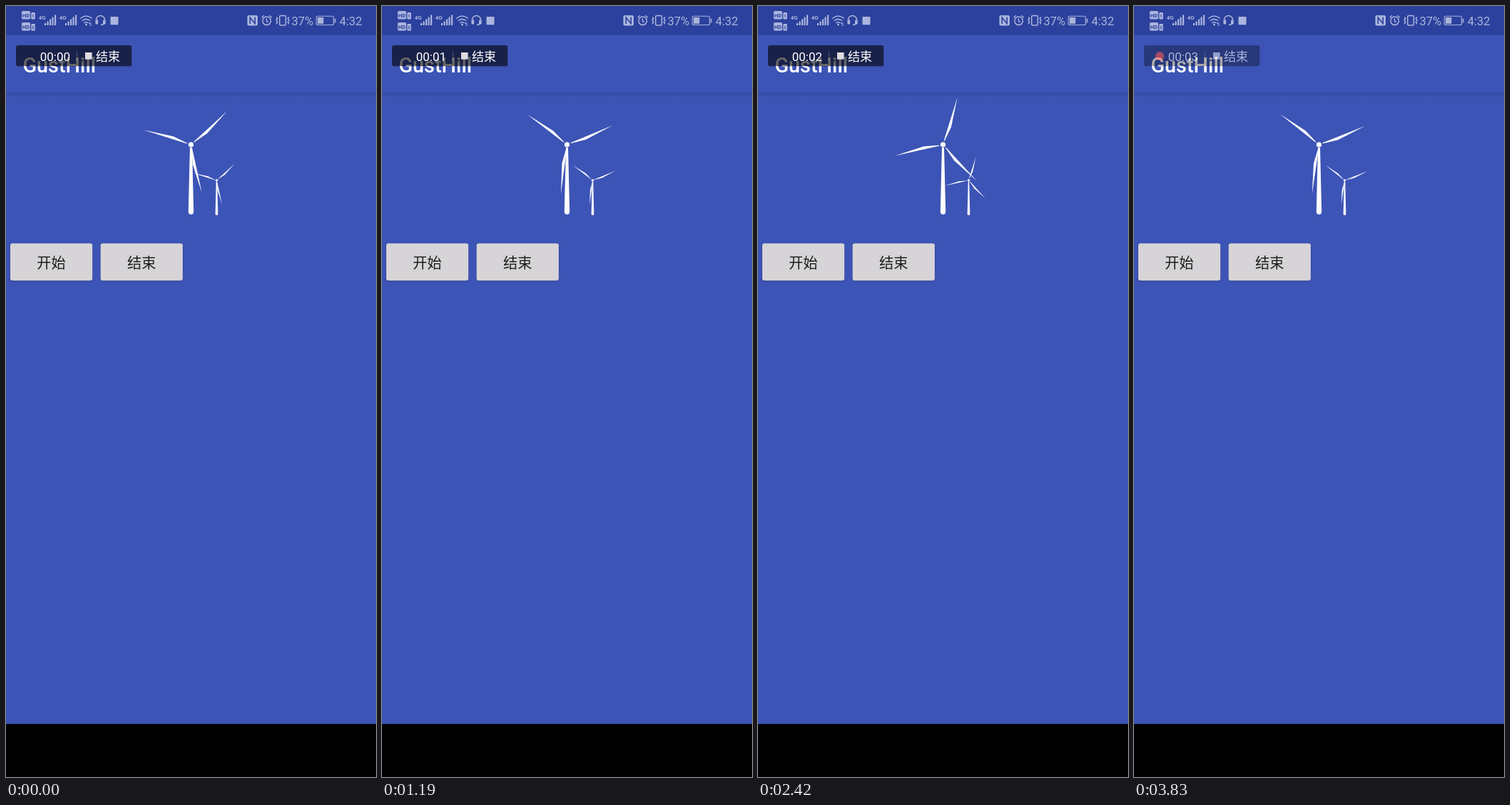
Write an HTML page that moves like this. It is 519 by 1079 pixels and loops after 3910 ms.

```html
<!DOCTYPE html>
<html lang="zh-CN">
<head>
<meta charset="utf-8">
<title>GustHill</title>
<style>
  html, body { margin: 0; width: 100%; height: 100%; overflow: hidden; background: #3c54b6; }
  svg { display: block; width: 100vw; height: 100vh; }
  text { font-family: Roboto, "Noto Sans CJK SC", "Noto Sans CJK", sans-serif; }
  .status { fill: #abb5dd; font-size: 16.5px; }
  .tiny { font-size: 8px; font-weight: 600; }
  .cut { fill: #2c419d; font-size: 7.6px; font-weight: 700; }
  .sim { fill: #2c419d; font-size: 6px; font-weight: 700; }
  .line { fill: none; stroke: #abb5dd; stroke-width: 1.5; }
  .title { font-size: 28.8px; font-weight: 500; fill: #fff; }
  .panel text { font-size: 17px; fill: #fff; }
  .button rect { filter: drop-shadow(0 1px 1.2px rgba(0,0,0,.2)); }
  .button text { font-size: 20.2px; fill: #1b1b1c; text-anchor: middle; }
</style>
</head>
<body>
<svg viewBox="0 0 519 1079" preserveAspectRatio="none">
  <defs>
    <linearGradient id="shade" x2="0" y2="1">
      <stop stop-color="#000" stop-opacity=".11"/>
      <stop offset="1" stop-color="#000" stop-opacity="0"/>
    </linearGradient>
    <radialGradient id="spot">
      <stop stop-color="#e4e0e0" stop-opacity=".55"/>
      <stop offset=".74" stop-color="#dcd8da" stop-opacity=".5"/>
      <stop offset=".84" stop-color="#77777c" stop-opacity=".28"/>
      <stop offset="1" stop-color="#77777c" stop-opacity="0"/>
    </radialGradient>
    <path id="blade" d="M-.4-5.5L.5-5.5L3.8-27L0-69.5Z"/>
    <g id="bars">
      <path d="M0 24h2.2v3h-2.2zM3.5 21.5h2.2V27h-2.2zM7 18.5h2.2V27H7zM10.5 15.5h2.2V27h-2.2zM14 12.5h2.2V27H14z"/>
      <text class="tiny" x="-8.3" y="19.3">4G</text>
    </g>
    <g id="hd">
      <rect width="12" height="11.5" rx="2"/>
      <text class="cut" x=".8" y="8.5">HD</text>
      <rect x="13.3" y="2" width="5.5" height="9.5" rx="1.2"/>
    </g>
    <g id="mill" fill="#fff">
      <path d="M-1.5 4H1.5L3.7 94A3.7 3.7 0 0 1-3.7 94Z"/>
      <g class="rotor">
        <use href="#blade"/>
        <use href="#blade" transform="rotate(120)"/>
        <use href="#blade" transform="rotate(240)"/>
      </g>
      <circle r="3.6"/>
    </g>
  </defs>

  <rect width="519" height="1079" fill="#3c54b6"/>
  <rect width="519" height="40.5" fill="#2c419d"/>
  <rect y="121.5" width="519" height="7" fill="url(#shade)"/>
  <rect y="1004.8" width="519" height="75"/>

  <g class="status">
    <use href="#hd" x="22" y="7"/><text class="sim" x="36.3" y="15.9">1</text>
    <use href="#hd" x="22" y="23"/><text class="sim" x="36.3" y="31.9">2</text>
    <use href="#bars" x="54"/>
    <use href="#bars" x="83"/>
    <path class="line" d="M104 17.5Q112.5 10.5 121 17.5M106.8 20.8Q112.5 16 118.2 20.8M109.4 23.8Q112.5 21.2 115.6 23.8"/>
    <circle cx="112.5" cy="26" r="1.4"/>
    <path d="M116 25l2-2.5 2 2.5zM117 26l1.8 2 1.8-2z"/>
    <path class="line" d="M126.5 22V19.5A6 6 0 0 1 138.5 19.5V22Q138.5 26 133 26.5"/>
    <rect x="125.5" y="19.5" width="3.6" height="6" rx="1.2"/>
    <rect x="136" y="19.5" width="3.6" height="6" rx="1.2"/>
    <rect x="146.5" y="15" width="11" height="11.3" rx="1"/>

    <rect x="338.5" y="13" width="14.5" height="14.5" rx="2"/>
    <path d="M342.3 25V16L349.3 24.5V15.5" fill="none" stroke="#2c419d" stroke-width="1.6"/>
    <circle class="line" cx="365.7" cy="20.8" r="5.8"/>
    <path class="line" d="M365.5 17.3V21.2L368 22.8M358.6 16.2L362 13.2M372.8 16.2L369.4 13.2"/>
    <rect class="line" x="383.8" y="13.5" width="8.6" height="13.5" rx="1.5"/>
    <path class="line" d="M379.2 15.5l1.6 2-1.6 2.6 1.6 2.6-1.6 2.3M397 15.5l-1.6 2 1.6 2.6-1.6 2.6 1.6 2.3"/>
    <text x="400.5" y="26.5">37%</text>
    <rect class="line" x="435.3" y="14.3" width="24.2" height="12.2" rx="2" style="stroke-width:1.1"/>
    <rect x="437" y="16" width="8.3" height="8.8"/>
    <rect x="460.8" y="17.5" width="1.6" height="6"/>
    <text x="467.7" y="26.5">4:32</text>
  </g>

  <text class="title" x="23.5" y="92.5">GustHill</text>

  <g class="panel" id="panel">
    <rect x="14" y="55" width="162.3" height="29.3" rx="3" fill-opacity=".6"/>
    <circle id="dot" cx="36" cy="70" r="6" fill="#ff4227"/>
    <text id="clock" x="47.7" y="76.5">00:00</text>
    <path d="M99.5 63V77" stroke="#fff" stroke-opacity=".25"/>
    <rect x="111" y="65" width="9.6" height="9.6" fill="#dedee2"/>
    <text x="126" y="77">结束</text>
  </g>

  <use href="#mill" transform="translate(259.5 194)"/>
  <use href="#mill" transform="translate(295.5 244) scale(.5)"/>

  <g class="button">
    <rect x="6" y="332.3" width="115.2" height="52" rx="2.8" fill="#d6d4d7"/>
    <rect id="press1" x="6" y="332.3" width="115.2" height="52" rx="2.8" opacity="0"/>
    <text x="63.4" y="366.7">开始</text>
  </g>
  <g class="button">
    <rect x="132.7" y="332.3" width="115.2" height="52" rx="2.8" fill="#d6d4d7"/>
    <rect id="press2" x="132.7" y="332.3" width="115.2" height="52" rx="2.8" opacity="0"/>
    <text x="190.2" y="366.7">结束</text>
  </g>
  <circle id="touch1" cx="67" cy="346" r="20" fill="url(#spot)" opacity="0"/>
  <circle id="touch2" cx="190" cy="369" r="20" fill="url(#spot)" opacity="0"/>
</svg>
<script>
  const LOOP = 3910, STEP = 42.56, LAST = 90;
  const $ = id => document.getElementById(id);
  const rotor = document.querySelector('.rotor');

  // [ms, value] pairs, linear in between
  const angle = [[780, 47.2], [890, 53.1], [1450, 79], [1910, 106], [2420, 136.6], [2850, 163.7], [3250, 188]];
  const fades = {
    touch1: [[510, 0], [550, 1], [850, 1], [1000, 0]],
    press1: [[590, 0], [680, .12], [920, .12], [1180, 0]],
    touch2: [[2990, 0], [3030, 1], [3230, 1], [3390, 0]],
    press2: [[3060, 0], [3140, .12], [3300, .12], [3560, 0]],
    panel: [[3700, 1], [3830, .55]]
  };

  function at(keys, t) {
    if (t <= keys[0][0]) return keys[0][1];
    for (let i = 1; i < keys.length; i++) {
      const [t0, a] = keys[i - 1], [t1, b] = keys[i];
      if (t < t1) return a + (b - a) * (t - t0) / (t1 - t0);
    }
    return keys[keys.length - 1][1];
  }

  function draw(ms) {
    const t = Math.min(LAST, Math.floor((ms + 6) / STEP)) * STEP;
    rotor.setAttribute('transform', `rotate(${at(angle, t)})`);
    for (const id in fades) $(id).setAttribute('opacity', at(fades[id], t));
    const tick = t + 20;
    $('clock').textContent = '00:0' + Math.floor(tick / 1000);
    $('dot').setAttribute('visibility', tick % 1000 >= 500 ? 'visible' : 'hidden');
  }

  const start = performance.now();
  function frame() {
    draw((performance.now() - start) % LOOP);
    requestAnimationFrame(frame);
  }
  draw(0);
  requestAnimationFrame(frame);
</script>
</body>
</html>
```
